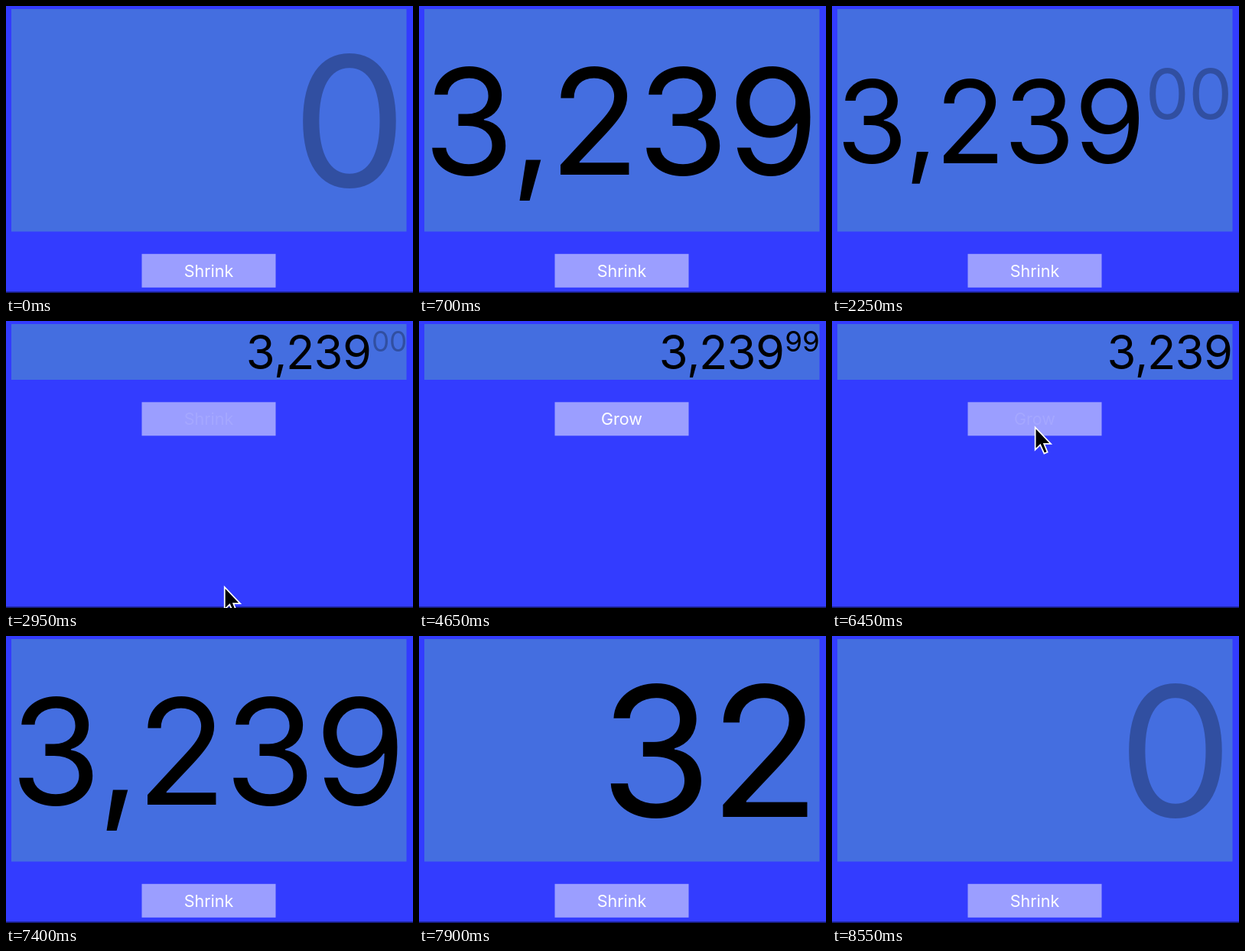
Animation of 532x376 px, one loop 8.6 s. Source, as an HTML page with a canvas:

```html
<!DOCTYPE html>
<html lang="en">
<head>
<meta charset="utf-8">
<title>Amount field</title>
<style>
  html, body { margin: 0; width: 100%; height: 100%; overflow: hidden; background: #333cff; }
  canvas { display: block; width: 532px; height: 376px; }
</style>
</head>
<body>
<canvas id="stage"></canvas>
<script>
const LOOP = 8600, W = 532, H = 376, DUR = 220;
const FONT = 'Inter, "Liberation Sans", sans-serif';
const ADVANCE = { '0': .624, '2': .598, '3': .601, '9': .622, ',': .252 };
const SUP = .6, SUP_RISE = .24, SLIDE = .8, GHOST = .28;

// Each slot is typed at `on` and deleted at `off`; a ghost digit fills it otherwise.
const DIGITS = [
  { ch: '3', on: 170, off: 8180, ghost: true },
  { ch: ',', on: 480, off: 7430, fixed: true },
  { ch: '2', on: 270, off: 7930 },
  { ch: '3', on: 380, off: 7680 },
  { ch: '9', on: 480, off: 7430 }
];
const CENTS = [
  { ch: '9', on: 3830, off: 5030 },
  { ch: '9', on: 3980, off: 4680 }
];
const CENTS_ON = 1310, CENTS_OFF = 5380;
const CURSOR = [
  [[2240, 302, 382], [2480, 268, 352], [2700, 265, 346], [2950, 285, 347], [3100, 300, 384]],
  [[5890, 302, 300], [6120, 288, 212], [6380, 265, 138], [6560, 265, 138], [6900, 276, 146], [7330, 302, 162]]
];
const ARROW = [[1.5, 3.6], [1.5, 28.5], [7.5, 22.7], [12.8, 34.5], [15.5, 33.3], [10.8, 22], [19, 22]];

const canvas = document.getElementById('stage');
const ctx = canvas.getContext('2d');
const dpr = window.devicePixelRatio || 1;
canvas.width = W * dpr;
canvas.height = H * dpr;

const lerp = (a, b, k) => a + (b - a) * k;
const clamp = k => Math.max(0, Math.min(1, k));
const ease = k => { k = clamp(k); return k * k * (3 - 2 * k); };
const ramp = (t, start, dur = DUR) => ease((t - start) / dur);
const span = (t, on, off) => ramp(t, on) * (1 - ramp(t, off));

function box(color, x, y, w, h) {
  ctx.fillStyle = color;
  ctx.fillRect(x, y, w, h);
}

function glyph(ch, x, mid, size, alpha) {
  if (alpha <= 0) return;
  ctx.font = `${size}px ${FONT}`;
  ctx.textAlign = 'center';
  ctx.globalAlpha = alpha;
  ctx.fillStyle = '#000';
  ctx.fillText(ch, x + ADVANCE[ch] * size / 2, mid + .364 * size);
  ctx.globalAlpha = 1;
}

function drawAmount(t, big) {
  const keys = DIGITS.map(d => span(t, d.on, d.off));
  const widths = DIGITS.map((d, i) =>
    d.ghost ? lerp(ADVANCE['0'], ADVANCE[d.ch], keys[i]) : ADVANCE[d.ch] * keys[i]);
  const cents = span(t, CENTS_ON, CENTS_OFF);
  const centStep = ADVANCE['0'] * SUP;
  const total = widths.reduce((a, b) => a + b, 0) + cents * centStep * 2;
  const size = Math.min(lerp(61.3, 237.6, big), 516 / total);
  const mid = lerp(40.9, 150.8, big);
  let x = lerp(524, 523, big) - total * size;

  DIGITS.forEach((d, i) => {
    const k = keys[i];
    if (d.ghost) glyph('0', x, mid, size, GHOST * (1 - k));
    glyph(d.ch, x, mid - (d.fixed ? 0 : (1 - k) * SLIDE * size), size, k);
    x += widths[i] * size;
  });

  const small = size * SUP, top = mid - SUP_RISE * size;
  for (const c of CENTS) {
    const k = span(t, c.on, c.off);
    glyph('0', x, top, small, GHOST * cents * (1 - k));
    glyph(c.ch, x, top - (1 - k) * SLIDE * small, small, k);
    x += centStep * size * cents;
  }
}

function label(t) {
  const grow = t >= 3000 && t < 6750;
  const dim = .1;
  let alpha = 1;
  if (t >= 2600 && t < 3400) alpha = t < 3000 ? lerp(1, dim, ramp(t, 2600, 100)) : lerp(dim, 1, ramp(t, 3050, 350));
  if (t >= 6350 && t < 7200) alpha = t < 6750 ? lerp(1, dim, ramp(t, 6350, 100)) : lerp(dim, 1, ramp(t, 6780, 350));
  return { text: grow ? 'Grow' : 'Shrink', alpha };
}

function drawButton(t, y) {
  box('#9b9eff', 177.5, y, 175, 44);
  const { text, alpha } = label(t);
  ctx.font = `21.5px ${FONT}`;
  ctx.textAlign = 'center';
  ctx.globalAlpha = alpha;
  ctx.fillStyle = '#fff';
  ctx.fillText(text, 265, y + 29.7);
  ctx.globalAlpha = 1;
}

function drawCursor(t) {
  const path = CURSOR.find(p => t >= p[0][0] && t < p[p.length - 1][0]);
  if (!path) return;
  const i = path.findIndex(p => p[0] > t);
  const [t0, x0, y0] = path[i - 1], [t1, x1, y1] = path[i];
  const k = (t - t0) / (t1 - t0);
  ctx.save();
  ctx.translate(lerp(x0, x1, k), lerp(y0, y1, k));
  ctx.beginPath();
  ARROW.forEach(([x, y]) => ctx.lineTo(x, y));
  ctx.closePath();
  ctx.lineWidth = 3.5;
  ctx.strokeStyle = '#fff';
  ctx.stroke();
  ctx.fillStyle = '#000';
  ctx.fill();
  ctx.restore();
}

function draw(t) {
  const big = 1 - ramp(t, 2660, 250) + ramp(t, 6530, 240);
  const bottom = lerp(77, 295.5, big);
  ctx.setTransform(dpr, 0, 0, dpr, 0, 0);
  box('#333cff', 0, 0, W, H);
  box('#446ee0', 7, 4, 516.5, bottom - 4);
  drawAmount(t, big);
  drawButton(t, lerp(106.3, 324.8, big));
  box('#151a6e', 0, 374.3, W, 1.7);
  drawCursor(t);
}

const start = performance.now();
function frame() {
  draw((performance.now() - start) % LOOP);
  requestAnimationFrame(frame);
}
frame();
</script>
</body>
</html>
```
